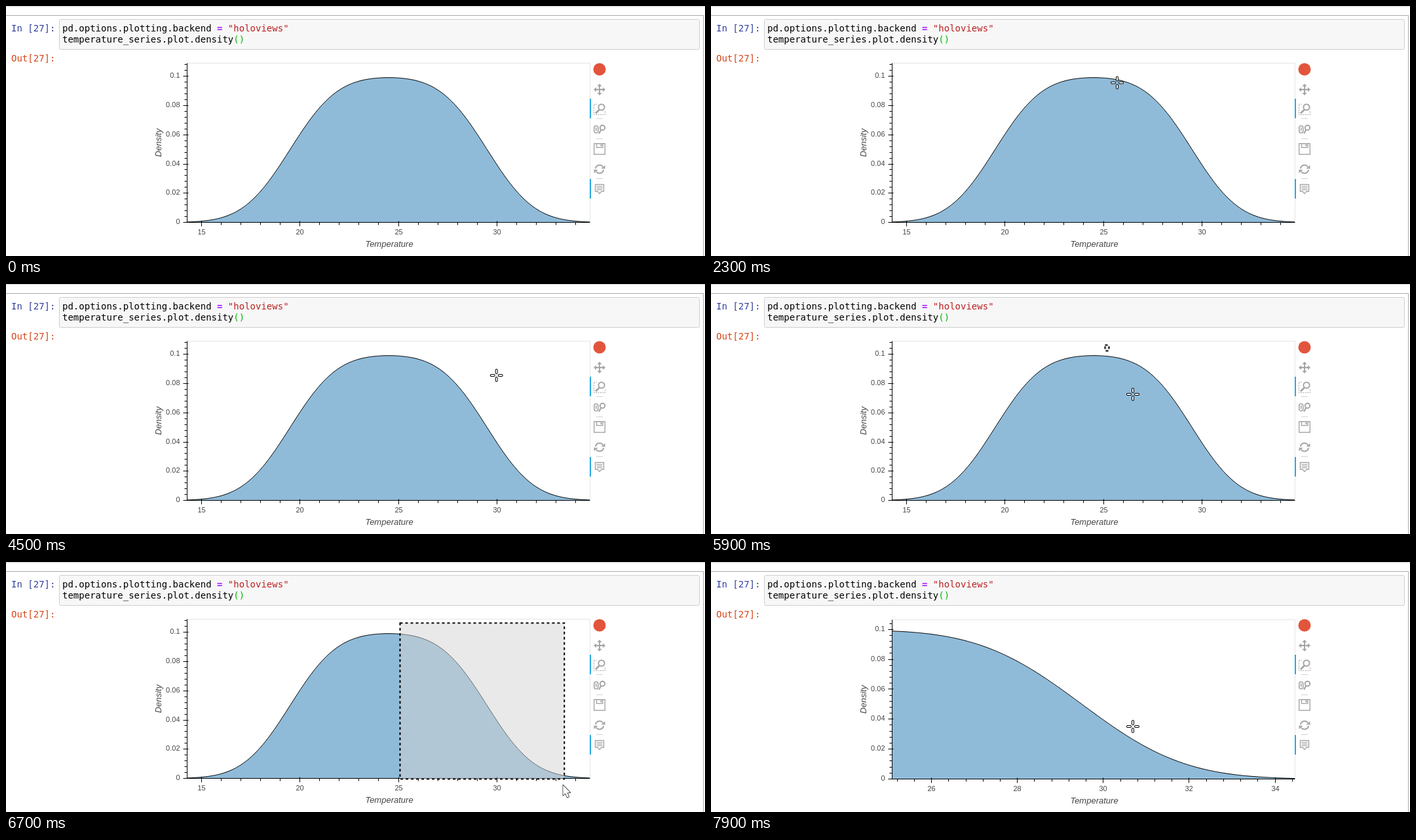
An HTML page with a canvas for the animation above (8000 ms loop, 1067x383 px).

```html
<!DOCTYPE html>
<html lang="en">
<head>
<meta charset="utf-8">
<title>Density plot</title>
<style>
html, body { margin: 0; width: 100%; height: 100%; overflow: hidden; background: #fff; }
canvas { display: block; }
</style>
</head>
<body>
<canvas id="stage" width="1067" height="383"></canvas>
<script>
const ctx = document.getElementById('stage').getContext('2d');
const LOOP = 8000, STEP = 100;
const MONO = '"DejaVu Sans Mono", monospace';
const SANS = '"Liberation Sans", Arial, sans-serif';
const LEFT = 276.5, RIGHT = 891.5, TOP = 87.5, BOTTOM = 331.5;
const SHOW = 200, DRAG = 5900, ZOOM = 7400, SETTLE = 7500;
const anchor = { x: 601.5, y: 93.5 };

// Pointer stops: time, x, y and how long it rests there
const stops = [
  [200, 78, 57], [1000, 279.5, 333], [1500, 405.5, 258], [1900, 509.5, 140.5],
  [2300, 620, 117.5], [2800, 797.5, 293.5], [3100, 876, 339], [3500, 927, 174, 100],
  [3700, 914, 181, 300], [4900, 616.5, 107], [5100, 598.5, 91.5, 300],
  [5600, 602, 93.5, 100], [5800, 608, 103], [5900, 644, 169], [6300, 768, 313],
  [6600, 845, 343], [7100, 884, 347, 500], [7900, 644, 252]
];

function pointerAt(t) {
  const i = Math.max(1, stops.findIndex(s => s[0] >= t));
  const [t0, x0, y0, rest = 0] = stops[i - 1], [t1, x1, y1] = stops[i];
  const k = Math.max(0, (t - t0 - rest) / (t1 - t0 - rest));
  return { x: x0 + (x1 - x0) * k, y: y0 + (y1 - y0) * k };
}

// Gaussian kernel estimate of the values 20 to 29
const WIDTH = 1.91;
function density(x) {
  let sum = 0;
  for (let v = 20; v < 30; v++) sum += Math.exp(-0.5 * ((x - v) / WIDTH) ** 2);
  return sum / (10 * WIDTH * Math.sqrt(2 * Math.PI));
}

const full = {
  x0: 20 - 3 * WIDTH, x1: 29 + 3 * WIDTH, top: 1.1 * density(24.5), step: 5
};
// The zoomed view spans the selected box
const dataX = x => full.x0 + (x - LEFT) / (RIGHT - LEFT) * (full.x1 - full.x0);
const zoomed = {
  x0: dataX(anchor.x),
  x1: dataX(883.5),
  top: full.top * (BOTTOM - anchor.y) / (BOTTOM - TOP),
  step: 2
};

function line(x0, y0, x1, y1, color = '#000', width = 1) {
  ctx.strokeStyle = color;
  ctx.lineWidth = width;
  ctx.beginPath();
  ctx.moveTo(x0, y0);
  ctx.lineTo(x1, y1);
  ctx.stroke();
}

function rect(x, y, w, h, color) {
  ctx.fillStyle = color;
  ctx.fillRect(x, y, w, h);
}

function text(str, x, y, color, font, align = 'left') {
  ctx.font = font;
  ctx.fillStyle = color;
  ctx.textAlign = align;
  ctx.fillText(str, x, y);
}

function polygon(...points) {
  ctx.beginPath();
  points.forEach(([x, y]) => ctx.lineTo(x, y));
  ctx.closePath();
}

function notebook() {
  rect(0, 0, 1067, 383, '#fff');
  rect(0, 0, 1067, 1, '#dcdcdc');
  rect(0, 1, 1067, 1, '#f0f0f0');
  line(0, 14.5, 1065, 14.5, '#ababab');
  line(1064.5, 14, 1064.5, 383, '#ababab');
  ctx.beginPath();
  ctx.roundRect(81.5, 20.5, 977, 46, 2);
  ctx.fillStyle = '#f7f7f7';
  ctx.fill();
  ctx.strokeStyle = '#cfcfcf';
  ctx.stroke();

  const font = '14px ' + MONO, advance = 8.428;
  const code = (str, col, y, color, weight = '') =>
    text(str, 86 + col * advance, y, color, weight + font);
  text('In [27]:', 8, 39, '#303f9f', font);
  text('Out[27]:', 8, 85, '#d84315', font);
  code('pd.options.plotting.backend', 0, 39, '#000');
  code('=', 28, 39, '#aa22ff', 'bold ');
  code('"holoviews"', 30, 39, '#ba2121');
  code('temperature_series.plot.density', 0, 56, '#000');
  code('()', 31, 56, '#00bb00');
}

const GRAY = '#a6a6a6';

function ring(x, y, r) {
  ctx.beginPath();
  ctx.arc(x, y, r, 0, 7);
  ctx.stroke();
}

const icons = {
  logo() {
    ctx.fillStyle = '#e2553c';
    ctx.beginPath();
    ctx.arc(0, 0, 9.5, 0, 7);
    ctx.fill();
  },
  pan() {
    for (let i = 0; i < 4; i++) {
      ctx.rotate(Math.PI / 2);
      ctx.fillRect(-1, -7, 2, 7);
      polygon([0, -9], [-3.5, -5], [3.5, -5]);
      ctx.fill();
    }
  },
  boxZoom() {
    ctx.lineWidth = 1;
    ctx.setLineDash([2, 1.5]);
    ctx.strokeRect(-8.5, -7.5, 17, 16);
    ctx.setLineDash([]);
    rect(-4, -9, 13, 12, '#fff');
    ctx.lineWidth = 2;
    ring(3, -3, 4.6);
    line(-0.5, 1, -6, 6.5, GRAY, 2.8);
  },
  wheelZoom() {
    ctx.lineWidth = 1.6;
    ctx.beginPath();
    ctx.roundRect(-8.2, -5.5, 6, 11, 3);
    ctx.stroke();
    line(-5.2, -3, -5.2, 2.5, GRAY, 1.6);
    ctx.lineWidth = 2;
    ring(4.5, -2.5, 3.7);
    line(2, 1, -0.8, 6.5, GRAY, 2.2);
  },
  save() {
    ctx.strokeRect(-8.3, -8.3, 16.6, 16.6);
    ctx.strokeRect(-4.5, -8.3, 9.5, 6);
    ctx.fillRect(1.5, -7, 2, 3);
  },
  reset() {
    ctx.lineWidth = 2;
    for (let i = 0; i < 2; i++) {
      ctx.beginPath();
      ctx.arc(0, 0, 6.3, Math.PI * 1.05, Math.PI * 1.8);
      ctx.stroke();
      polygon([8.5, -6], [8.5, -0.5], [2.5, -1]);
      ctx.fill();
      ctx.rotate(Math.PI);
    }
  },
  hover() {
    polygon([-6.5, -6.5], [6.5, -6.5], [6.5, 4], [3, 4], [0, 7.5], [-3, 4], [-6.5, 4]);
    ctx.stroke();
    for (let y = -3.5; y < 2; y += 2.5) line(-4.5, y, 4.5, y, GRAY, 1.2);
  }
};

function toolbar() {
  for (const y of [172.5, 203.5, 264.5]) line(901, y, 911, y, '#d3d3d3');
  for (const y of [142, 265]) rect(891, y, 2, 30, '#26aae1');
  Object.values(icons).forEach((icon, i) => {
    ctx.save();
    ctx.translate(906, Math.round(97 + i * 30.5));
    ctx.strokeStyle = ctx.fillStyle = GRAY;
    ctx.lineWidth = 1.4;
    icon();
    ctx.restore();
  });
}

function curve(px, py, { x0, x1 }) {
  ctx.save();
  ctx.beginPath();
  ctx.rect(LEFT - 0.5, TOP, RIGHT - LEFT, BOTTOM - TOP + 1);
  ctx.clip();
  ctx.beginPath();
  ctx.moveTo(LEFT, BOTTOM);
  for (let i = 0; i <= 300; i++) {
    const v = x0 + (x1 - x0) * i / 300;
    ctx.lineTo(px(v), py(density(v)));
  }
  ctx.lineTo(RIGHT, BOTTOM);
  ctx.closePath();
  ctx.fillStyle = '#8fbbd9';
  ctx.fill();
  ctx.strokeStyle = '#000';
  ctx.lineWidth = 1;
  ctx.stroke();
  ctx.restore();
}

function plot(view) {
  const { x0, x1, top, step } = view;
  const px = v => LEFT + (v - x0) / (x1 - x0) * (RIGHT - LEFT);
  const py = v => BOTTOM - v / top * (BOTTOM - TOP);
  const crisp = v => Math.floor(v) + 0.5;

  ctx.strokeStyle = '#e5e5e5';
  ctx.lineWidth = 1;
  ctx.strokeRect(LEFT, TOP, RIGHT - LEFT, BOTTOM - TOP);
  curve(px, py, view);
  line(LEFT, TOP, LEFT, BOTTOM);
  line(LEFT, BOTTOM, RIGHT, BOTTOM);

  // Five minor ticks to each labelled one
  const label = '11px ' + SANS;
  for (let i = 0; i * 0.004 <= top; i++) {
    const v = i * 0.004, y = crisp(py(v)), major = i % 5 === 0;
    line(major ? 270.5 : 272.5, y, major ? 278.5 : LEFT, y);
    if (major) text(String(+v.toFixed(2)), 265.5, Math.round(py(v) + 2.6), '#444', label, 'right');
  }
  const minor = step / 5;
  for (let i = Math.ceil(x0 / minor); i * minor <= x1; i++) {
    const x = crisp(px(i * minor)), major = i % 5 === 0;
    line(x, BOTTOM - (major ? 2 : 0), x, BOTTOM + (major ? 6 : 4));
    if (major) text(String(Math.round(i * minor)), x, 350, '#444', label, 'center');
  }

  const title = 'italic 13px ' + SANS;
  text('Temperature', 585, 369, '#444', title, 'center');
  ctx.save();
  ctx.translate(237, (TOP + BOTTOM) / 2);
  ctx.rotate(-Math.PI / 2);
  text('Density', 0, 0, '#444', title, 'center');
  ctx.restore();
}

function selection(t) {
  // The box trails the pointer when the drag begins
  const end = pointerAt(t === DRAG ? t - STEP : t);
  const right = Math.min(end.x - 0.5, RIGHT), bottom = Math.min(end.y - 0.5, BOTTOM + 1);
  ctx.beginPath();
  ctx.rect(anchor.x, anchor.y, right - anchor.x, bottom - anchor.y);
  ctx.fillStyle = 'rgba(211,211,211,0.5)';
  ctx.fill();
  ctx.strokeStyle = '#000';
  ctx.lineWidth = 2;
  ctx.setLineDash([4, 4]);
  ctx.stroke();
  ctx.setLineDash([]);
}

function crosshair() {
  ctx.lineCap = 'round';
  for (const [color, width] of [['#000', 4], ['#fff', 2]]) {
    for (let a = 0; a < 4; a++) {
      line(4, 0, 8, 0, color, width);
      ctx.rotate(Math.PI / 2);
    }
  }
}

function outline() {
  ctx.lineJoin = 'round';
  ctx.lineWidth = 1.3;
  ctx.fillStyle = '#fff';
  ctx.strokeStyle = '#000';
  ctx.stroke();
  ctx.fill();
}

function arrow() {
  ctx.translate(-2.5, -2);
  polygon([0, 0], [0, 16], [3.5, 12.8], [6.3, 19], [9, 17.7], [6.4, 11.8], [11, 11.5]);
  outline();
}

function hand() {
  ctx.beginPath();
  ctx.roundRect(-1.5, 0, 3, 12, 1.5);
  ctx.roundRect(-4, 7.5, 16, 12, 4);
  outline();
}

function pointer(t) {
  const { x, y } = pointerAt(t);
  const inPlot = x >= LEFT && x < RIGHT && y > TOP && y < BOTTOM + 2;
  const inBar = x >= RIGHT && x <= 921 && y > TOP && y < 295;
  ctx.save();
  ctx.translate(x, y);
  (inPlot ? crosshair : inBar ? hand : arrow)();
  ctx.restore();
}

function draw(now) {
  const t = Math.floor(now % LOOP / STEP) * STEP;
  notebook();
  ctx.save();
  if (t >= SETTLE) ctx.translate(0, 1);
  plot(t >= ZOOM ? zoomed : full);
  ctx.restore();
  toolbar();
  if (t >= DRAG && t < ZOOM) selection(t);
  if (t >= SHOW) pointer(t);
}

const start = performance.now();
function tick() {
  draw(performance.now() - start);
  requestAnimationFrame(tick);
}
tick();
</script>
</body>
</html>
```
